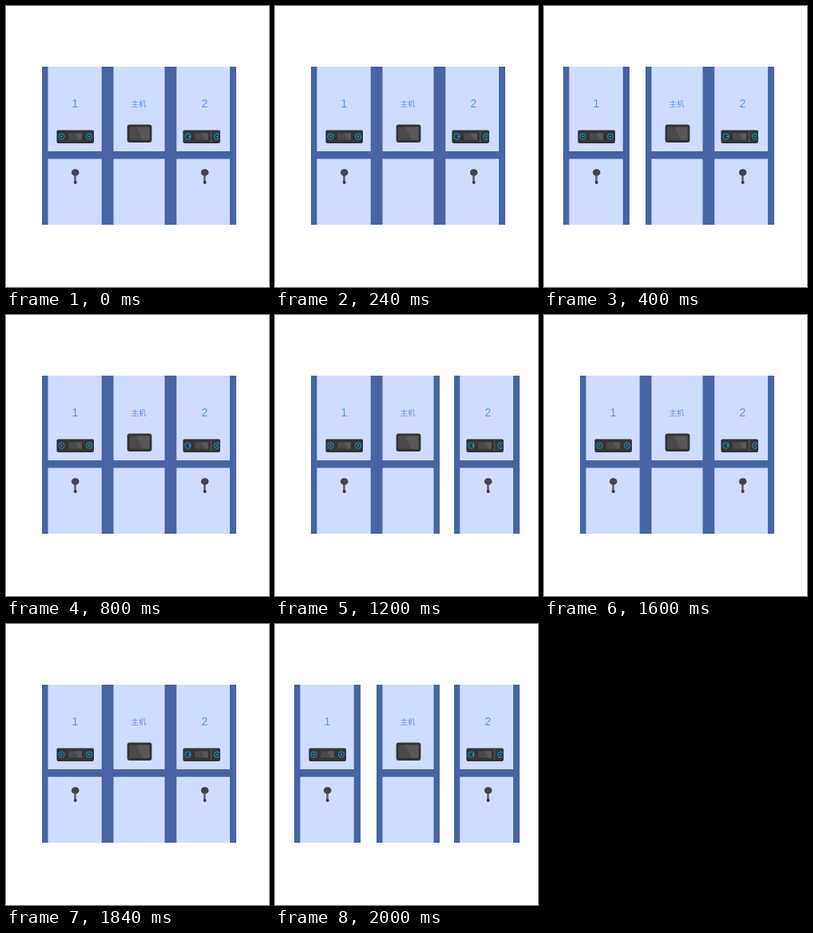
These frames come from a looping animation (329x352 px, 2.4 s). An HTML page:

```html
<!DOCTYPE html>
<html lang="zh">
<head>
<meta charset="utf-8">
<title>Lockers</title>
<style>
  html, body { margin: 0; width: 100%; height: 100%; overflow: hidden; background: #fff; }
  svg { display: block; }
  .frame { fill: #4764a4; }
  .panel { fill: #cfdcff; }
  .body { fill: #343436; }
  .screen { fill: #4a4a4b; }
  .shine { fill: #585859; }
  .ring { fill: none; stroke: #1b86b4; stroke-width: 1.2; }
  .dot { fill: #29a0d0; }
  .label { fill: #5b92f8; font: 14px "Liberation Sans", sans-serif; text-anchor: middle; }
  .host { font: 500 9.5px "Noto Sans CJK SC", "Noto Sans CJK", sans-serif; }
</style>
</head>
<body>
<svg width="329" height="352" viewBox="0 0 329 352">
  <defs>
    <g id="key">
      <rect x="-1.3" y="3" width="2.6" height="10" fill="#77777b"/>
      <rect x="-1.3" y="3" width="1" height="10" fill="#55555b"/>
      <ellipse rx="4.8" ry="4.3" fill="#444449"/>
      <circle cy="12.6" r="2" fill="#3c3c46"/>
    </g>
    <g id="lock">
      <rect class="body" width="46.6" height="16.4" rx="1.8"/>
      <rect class="screen" x="14.8" y="4" width="16.8" height="8"/>
      <path class="shine" d="M23 4h8.600v8h-4.600z"/>
    </g>
  </defs>

  <g id="left">
    <rect class="frame" x="45" y="76" width="83" height="198"/>
    <path class="panel" d="M52.500 76h67.200v106h-67.200zM52.500 191.500h67.200v82.500h-67.200z"/>
    <text class="label" x="86.300" y="127">1</text>
    <use href="#lock" x="63.400" y="155.500"/>
    <circle class="ring" cx="69.500" cy="163.600" r="3.500"/>
    <circle class="ring" cx="104" cy="163.600" r="3.500"/>
    <circle class="dot" cx="69.500" cy="163.600" r="1.100"/>
    <circle class="dot" cx="104" cy="163.600" r="1.100"/>
    <use href="#key" x="86.700" y="208.500"/>
  </g>

  <g id="middle">
    <rect class="frame" x="127" y="76" width="79" height="198"/>
    <path class="panel" d="M134.500 76h64v106h-64zM134.500 191.500h64v82.500h-64z"/>
    <text class="label host" x="166" y="126">主机</text>
    <rect class="body" x="151.600" y="148.500" width="30.800" height="22.600" rx="3"/>
    <rect class="screen" x="154.500" y="151.500" width="25" height="16.200" rx=".8"/>
    <path class="shine" d="M163 151.500h16.500v16.200h-8.500z"/>
  </g>

  <g id="right">
    <rect class="frame" x="206" y="76" width="82" height="198"/>
    <path class="panel" d="M213.300 76h66.700v106h-66.700zM213.300 191.500h66.700v82.500h-66.700z"/>
    <text class="label" x="248.500" y="127">2</text>
    <use href="#lock" x="221.400" y="155.500"/>
    <circle class="ring" cx="227.500" cy="163.600" r="3.500"/>
    <path class="ring" d="M267 161.700a3.500 3.500 0 1 0 0 3.800"/>
    <circle class="dot" cx="229.800" cy="163.600" r="1.200"/>
    <circle class="dot" cx="264.300" cy="163.600" r="1.100"/>
    <rect x="256.200" y="157" width="1" height="13.500" fill="#626264"/>
    <use href="#key" x="248.700" y="208.500"/>
  </g>
</svg>
<script>
  const STEP = 400;
  const poses = {
    left: [0, -21, 0, 0, 0, -21],
    right: [0, 0, 0, 18, 0, 18],
  };

  for (const [id, shifts] of Object.entries(poses)) {
    const frames = [...shifts, shifts[0]].map((x, i) => ({
      transform: `translateX(${x}px)`,
      offset: i / shifts.length,
      easing: "step-end",
    }));
    document.getElementById(id).animate(frames, {
      duration: STEP * shifts.length,
      iterations: Infinity,
    });
  }
</script>
</body>
</html>
```
